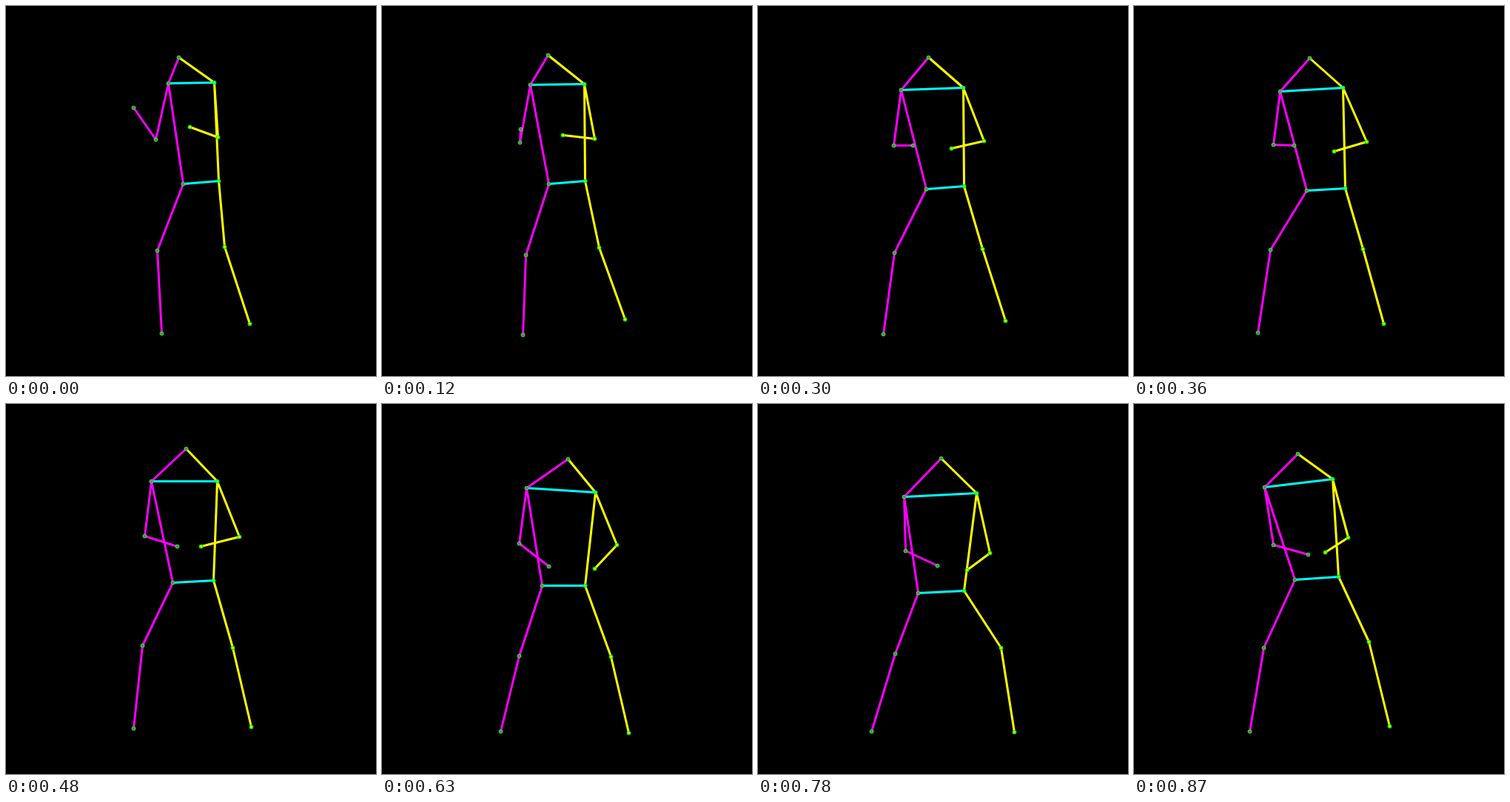
Write an HTML page with a canvas that moves like this. It is 500 px wide and 500 px high and loops after 900 ms.

```html
<!DOCTYPE html>
<html>
<head>
<meta charset="utf-8">
<title>Walking skeleton</title>
<style>
  html, body { margin: 0; width: 100%; height: 100%; overflow: hidden; background: #000; }
  canvas { display: block; }
</style>
</head>
<body>
<canvas id="stage" width="500" height="500"></canvas>
<script>
const ctx = document.getElementById('stage').getContext('2d');
const LOOP = 900, STEP = 30;
const times = [0, 210, 360, 480, 630, 780, 870];

// One x and one y track per joint; a gap lies on the straight line between its neighbours.
// Left hip and shoulder are offsets from the right ones.
const tracks = {
  head: [[233, 221, 237, , 251, 247, 221], [69, 65, 70, 60, 74, 73, 67]],
  shoulderR: [[281, 270, 282, , 288, 295, 268], [103, , 110, 104, 119, 120, 101]],
  shoulderL: [[-62, -80, , , , -98, -92], [1, 1, 5, , -6, , 11]],
  elbowR: [[286, 290, 314, , 317, 313, 289], [177, , 183, 179, , 201, 180]],
  elbowL: [[202, 178, 188, , 185, 199, 188], [180, 186, 187, 178, , 198, 190]],
  wristR: [[248, 245, 270, 263, 287, 282, 258], [163, , 196, 192, 222, 224, 200]],
  wristL: [[172, 198, , 231, 225, 242, 235], [137, 184, , 192, 219, 218, 203]],
  hipR: [[287, 269, 285, , 274, 278, 276], [236, 237, 246, 238, , 252, 233]],
  hipL: [[-48, , -52, , , -62, -59], [4, , , 3, 0, , 4]],
  kneeR: [[295, 294, 309, 306, 309, 328, 317], [325, , , 329, 341, , 321]],
  kneeL: [[204, 187, 184, , , 185, 175], [330, 338, 329, 326, 340, 337, 329]],
  footR: [[329, 329, 337, 331, 333, 346, 345], [429, 421, , , 444, 443, 435]],
  footL: [[210, 177, 167, 172, 160, 153, 156], [442, 445, , 438, 442, , 442]]
};

const side = s => [['head', 'shoulder' + s],
  ...['shoulder-elbow', 'elbow-wrist', 'shoulder-hip', 'hip-knee', 'knee-foot']
    .map(bone => bone.split('-').map(joint => joint + s))];
const bones = [
  ['#ff0', side('R')],
  ['#0ff', [['shoulderL', 'shoulderR'], ['hipL', 'hipR']]],
  ['#f0f', side('L')]
];

function fillGaps(keys) {
  return times.map((t, i) => {
    let a = i, b = i;
    while (!(a in keys)) a--;
    while (!(b in keys)) b++;
    return a === b ? keys[i] : keys[a] + (keys[b] - keys[a]) * (t - times[a]) / (times[b] - times[a]);
  });
}
for (const name in tracks) tracks[name] = tracks[name].map(fillGaps);

function slope(keys, i) {
  const a = Math.max(i - 1, 0), b = Math.min(i + 1, keys.length - 1);
  return (keys[b] - keys[a]) / (times[b] - times[a]);
}

// Cubic Hermite curve through the keys
function valueAt(keys, t) {
  let i = 0;
  while (i < times.length - 2 && t >= times[i + 1]) i++;
  const span = times[i + 1] - times[i], u = (t - times[i]) / span, v = 1 - u;
  return v * v * ((1 + 2 * u) * keys[i] + u * span * slope(keys, i))
    + u * u * ((1 + 2 * v) * keys[i + 1] - v * span * slope(keys, i + 1));
}

function poseAt(t) {
  const pose = {};
  for (const name in tracks) pose[name] = tracks[name].map(keys => valueAt(keys, t));
  for (const part of ['shoulder', 'hip'])
    pose[part + 'L'] = pose[part + 'L'].map((d, i) => d + pose[part + 'R'][i]);
  for (const name in pose) pose[name] = pose[name].map(v => Math.round(v) + 0.5);
  return pose;
}

function draw(now) {
  const t = Math.floor(now % LOOP / STEP) * STEP;
  const pose = poseAt(t);
  ctx.fillStyle = '#000';
  ctx.fillRect(0, 0, 500, 500);
  ctx.lineCap = 'round';
  ctx.lineWidth = 3;
  for (const [color, links] of bones) {
    ctx.strokeStyle = color;
    ctx.beginPath();
    for (const [from, to] of links) {
      ctx.moveTo(...pose[from]);
      ctx.lineTo(...pose[to]);
    }
    ctx.stroke();
  }
  ctx.strokeStyle = '#0f0';
  ctx.lineWidth = 1.3;
  for (const [x, y] of Object.values(pose)) {
    ctx.beginPath();
    ctx.arc(x, y, 2.2, 0, 2 * Math.PI);
    ctx.stroke();
  }
  requestAnimationFrame(draw);
}
requestAnimationFrame(draw);
</script>
</body>
</html>
```
